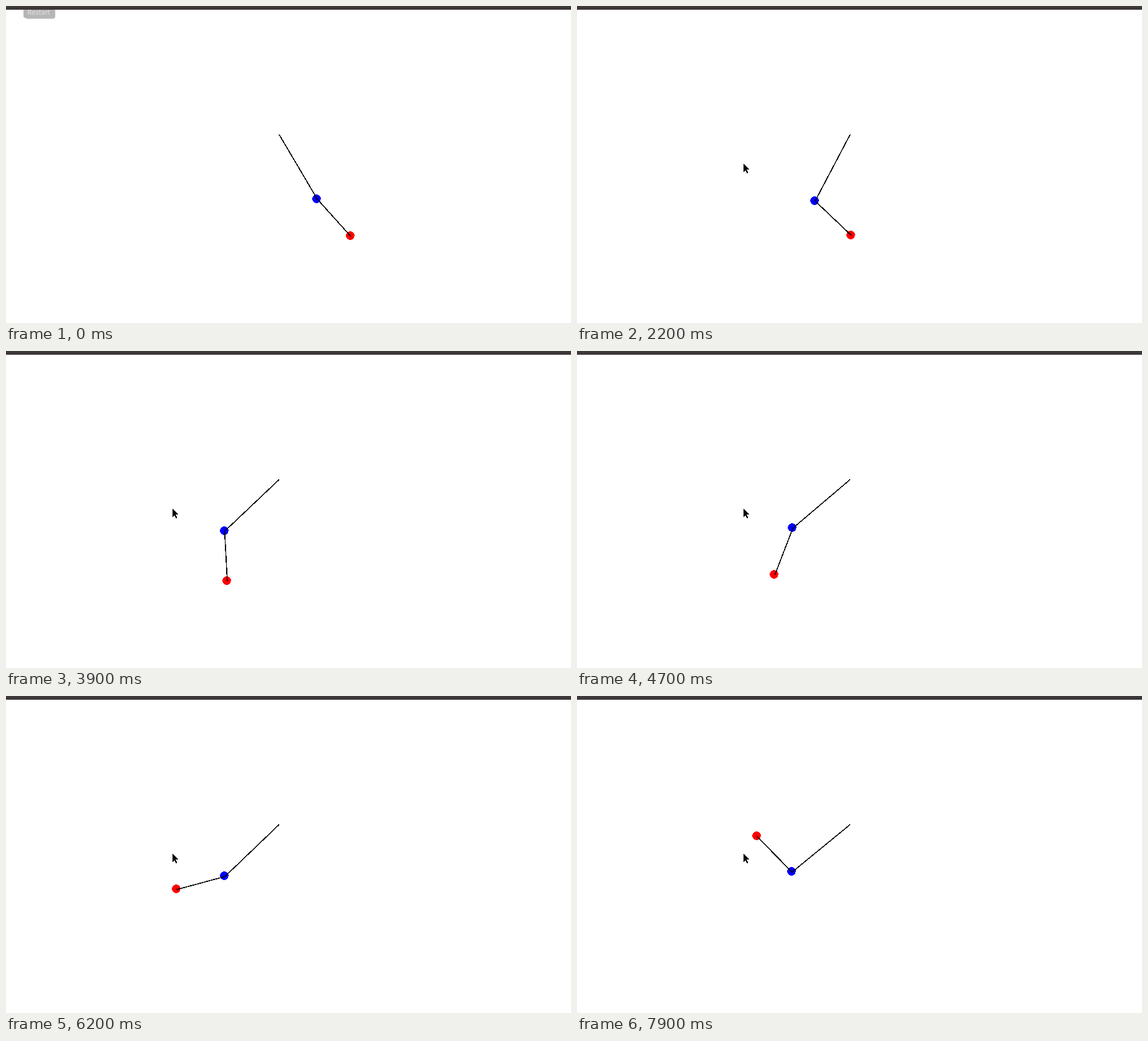
An HTML page that plays this animation: 906 px wide and 508 px high, repeating every 8000 ms.

```html
<!DOCTYPE html>
<html lang="en">
<head>
<meta charset="utf-8">
<title>Double pendulum</title>
<style>
  html, body { margin: 0; width: 100%; height: 100%; overflow: hidden; background: #fff; }
  svg { display: block; }
  text { font: 10px "DejaVu Sans", sans-serif; fill: #e4e4e4; }
  line { stroke: #000; stroke-width: 1.6; }
</style>
</head>
<body>
<svg width="906" height="508" viewBox="0 0 906 508">
  <g id="tooltip">
    <rect x="31" y="4" width="48" height="16.5" rx="4" fill="#777" opacity=".5"/>
    <rect x="28" y="2" width="49" height="17" rx="3" fill="#b6b6b6"/>
    <text x="52.5" y="14" text-anchor="middle">Restart</text>
  </g>
  <rect width="906" height="6" fill="#3d3738"/>
  <g shape-rendering="crispEdges">
    <circle id="upperBall" r="6.8" fill="#00f"/>
    <circle id="lowerBall" r="6.8" fill="#f00"/>
    <line id="upperRod"/>
    <line id="lowerRod"/>
    <path id="cursor" d="M267 252.5V266L270 263L272.5 267.5H274.5L272 262H276Z"/>
  </g>
</svg>
<script>
const LOOP = 8000, TICK = 100, RELEASE = 1500;
const PIVOT = { x: 438, y: 206 };
const START = { upper: 30.6, lower: 42 };

// Key poses after the release: degrees from straight down
const POSES = [
  { at: 1500, upper: -16.5, lower: 57 },
  { at: 2200, upper: -27.8, lower: 46.5 },
  { at: 3200, upper: -41.6, lower: 22.7 },
  { at: 4700, upper: -49.7, lower: -21.1 },
  { at: 5600, upper: -47.7, lower: -52.6 },
  { at: 6800, upper: -45.7, lower: -97.1 },
  { at: 7900, upper: -50.7, lower: -135.5 }
];

const el = id => document.getElementById(id);
const set = (id, attrs) => {
  for (const name in attrs) el(id).setAttribute(name, attrs[name]);
};

// Smooth curve through the key poses, with slopes taken from the neighbours
function angleAt(ms, part) {
  if (ms < TICK) return START[part];
  const last = POSES.length - 1;
  const slope = i => {
    const a = POSES[Math.max(0, i - 1)], b = POSES[Math.min(last, i + 1)];
    return (b[part] - a[part]) / (b.at - a.at);
  };
  const time = Math.max(ms, RELEASE);
  const i = Math.max(1, POSES.findIndex(p => p.at >= time));
  const a = POSES[i - 1], b = POSES[i];
  const span = b.at - a.at, f = (time - a.at) / span, g = 1 - f;
  return a[part] * g * g * (1 + 2 * f) + b[part] * f * f * (1 + 2 * g)
    + span * f * g * (slope(i - 1) * g - slope(i) * f);
}

function drawArm(part, from, length, ms) {
  const angle = angleAt(ms, part) * Math.PI / 180;
  const to = {
    x: from.x + length * Math.sin(angle),
    y: from.y + length * Math.cos(angle)
  };
  set(part + "Rod", { x1: from.x, y1: from.y, x2: to.x, y2: to.y });
  set(part + "Ball", { cx: Math.round(to.x) - 1, cy: Math.round(to.y) - 1 });
  return to;
}

function draw(time) {
  const ms = Math.floor(time / TICK) * TICK;
  const joint = drawArm("upper", PIVOT, 120.4, ms);
  drawArm("lower", joint, 80.3, ms);
  set("tooltip", { opacity: ms < TICK ? 1 : ms <= RELEASE ? 0.4 : 0 });
  set("cursor", { opacity: ms > RELEASE ? 1 : 0 });
}

const begin = performance.now();
function frame() {
  draw((performance.now() - begin) % LOOP);
  requestAnimationFrame(frame);
}
frame();
</script>
</body>
</html>
```
